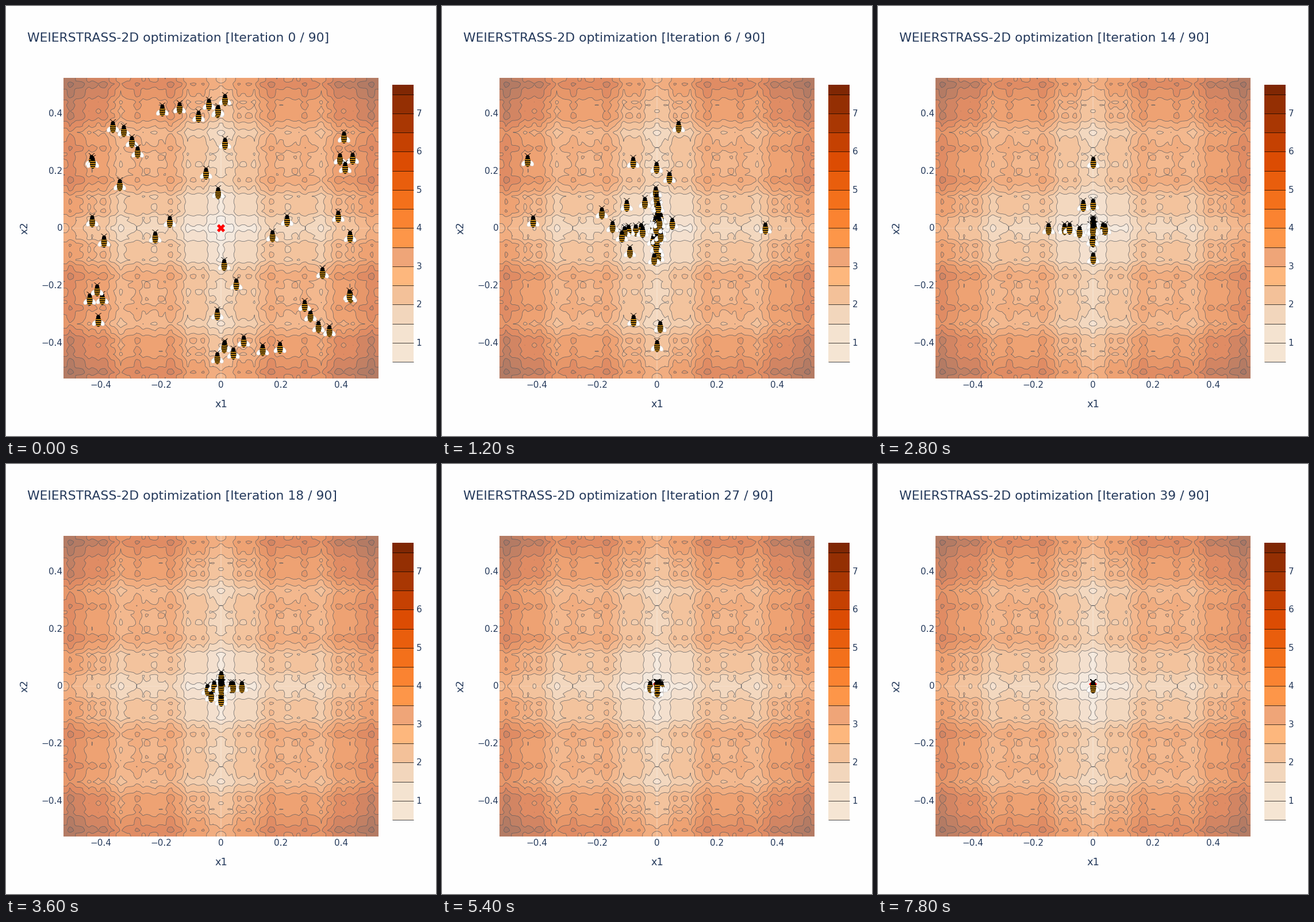
Write a matplotlib script that moves like this. It is 748x748 px and loops after 8000 ms.

```python
import numpy as np
import matplotlib.pyplot as plt
from matplotlib.animation import FuncAnimation
from matplotlib.collections import PathCollection
from matplotlib.patches import PathPatch, Rectangle
from matplotlib.path import Path
from matplotlib.transforms import Affine2D, IdentityTransform

SIZE, DPI = 748, 100
S = SIZE / 600                      # layout is designed on a 600 unit square
PT = 72 / DPI                       # points per pixel
CX, CY = 300 * S, 310 * S           # pixel position of the optimum
KX, KY = 440 * S / 1.05, 420 * S / 1.05
STEPS, SETTLED = 40, 30
INK = "#24395b"
rng = np.random.default_rng(4)

fig = plt.figure(figsize=(SIZE / DPI, SIZE / DPI), dpi=DPI, facecolor="#fefefe")
ax = fig.add_axes([0, 0, 1, 1])
oranges = plt.get_cmap("Oranges")


def text(x, y, s, px, **kw):
    kw = {"ha": "center", "va": "center", **kw}
    return ax.text(x, y, s, fontsize=px * PT, color=INK, family="DejaVu Sans", **kw)


# ---------- contour map ----------
def weierstrass(x):
    k = np.arange(21)[:, None]
    return (0.5 ** k * (1 - np.cos(2 * np.pi * 3.0 ** k * x))).sum(0)


def smooth_loop(p):
    """Closed centripetal Catmull-Rom curve through p, as Bezier segments."""
    back, ahead = np.roll(p, 1, 0) - p, np.roll(p, -1, 0) - p
    a = np.hypot(*back.T)[:, None] ** 0.5
    b = np.hypot(*ahead.T)[:, None] ** 0.5
    num = b * b * back - a * a * ahead
    c_in = p + num / (3 * b * (a + b) + 1e-9)
    c_out = p - num / (3 * a * (a + b) + 1e-9)
    seg = np.stack([c_out, np.roll(c_in, -1, 0), np.roll(p, -1, 0)], 1)
    verts = np.vstack([p[:1], seg.reshape(-1, 2)])
    return Path(verts, [Path.MOVETO] + [Path.CURVE4] * (len(verts) - 1))


def region(xs, ys, z, level):
    cs = ax.contourf(xs, ys, z, levels=[level, 99])
    loops = [smooth_loop(np.asarray(s)[:-1]) for s in cs.allsegs[0] if len(s) > 3]
    cs.remove()
    return Path.make_compound_path(*loops)


def band_color(mid):
    return np.array(oranges((mid - 0.25) / 7.5)[:3])


def map_color(mid):
    return 0.6 * band_color(mid) + 0.4 * np.array([229, 236, 246]) / 255


grid = np.linspace(-0.525, 0.525, 100)
h = grid[1] - grid[0]
f = np.pad(weierstrass(grid), 1, mode="edge")
wide = np.r_[grid[0] - h, grid, grid[-1] + h]
z = f[:, None] + f[None, :]
levels = np.arange(0.5, 7.6, 0.5)
regions = [region(CX + wide * KX, CY - wide * KY, z, v) for v in levels]

box = Rectangle((80 * S, 100 * S), 440 * S, 420 * S, fc=map_color(0.25), ec="none", zorder=1)
ax.add_patch(box)


def on_map(artist):
    ax.add_artist(artist)
    artist.set_clip_path(box)


for v, path in zip(levels, regions):
    on_map(PathPatch(path, fc=map_color(v + 0.25), ec="none", zorder=2))
for xy, w, t in [((80 * S, CY - 0.8), 440 * S, 1.6), ((CX - 0.8, 100 * S), 1.6, 420 * S)]:
    on_map(Rectangle(xy, w, t, fc="white", ec="none", alpha=0.2, zorder=2.5))
for path in regions:
    on_map(PathPatch(path, fc="none", ec=(0.36, 0.37, 0.385), lw=0.66 * PT,
                     joinstyle="round", zorder=3))

# ---------- colour bar ----------
PALE = ["#f5e5d3", "#f4e3d0", "#f2d6bc", "#f3c199", "#fdb77d", "#efa578"]


def bar_y(v):
    return 510 * S - (v - 0.25) * 400 * S / 7.5


for i, v in enumerate(levels):
    top = min(v + 0.5, 7.75)
    fc = PALE[i] if i < len(PALE) else band_color(v + 0.25)
    ax.add_patch(Rectangle((672, bar_y(top)), 37.4, bar_y(v) - bar_y(top), fc=fc, ec="none", zorder=2))
ax.hlines(bar_y(levels), 672, 709.4, color="black", lw=0.7 * PT, zorder=3)
for v in range(1, 8):
    text(713.5, bar_y(v) + 0.3, str(v), 15.2, ha="left")

# ---------- labels ----------
for v in (-0.4, -0.2, 0, 0.2, 0.4):
    label = f"{v:g}".replace("-", "\u2212")
    text(CX + v * KX, 659.3, label, 15.2)
    text(98.6, CY - v * KY + 0.4, label, 15.2, ha="right")
text(CX, 692.5, "x1", 17.8)
text(32, CY, "x2", 17.8, rotation=90)
title = text(37.4, 62.3, "", 21.9, ha="left", va="baseline")

# optimum marker: one arm tip, turned four times
r = 0.4 * 10 * S / np.sqrt(2)
tip = np.array([(0, 1), (1, 2), (2, 1)]) * r
turn = np.array([(0, -1), (1, 0)])
cross = np.vstack([tip @ np.linalg.matrix_power(turn, k) for k in range(4)])
ax.add_patch(plt.Polygon(cross + (CX, CY), fc="red", ec="none", zorder=4))


# ---------- bee shape, in pixels with y upwards ----------
def oval(x, y, w, t, angle=0):
    m = Affine2D().scale(w / 2, t / 2).rotate_deg(angle).translate(x, y)
    return Path.unit_circle().transformed(m)


def stripe(y):
    half = 4.8 * np.sqrt(1 - ((y + 1.8) / 9.6) ** 2)
    return Path([(-half, y + 0.8), (0, y + 0.5), (half, y + 0.8),
                 (half, y - 0.7), (0, y - 1), (-half, y - 0.7)])


def antenna(side):
    return Path([(side, 9), (2 * side, 11.6), (5.2 * side, 12.6)],
                [Path.MOVETO, Path.CURVE3, Path.CURVE3])


parts = [(antenna(s), "none", "black", 0.8) for s in (-1, 1)]
parts += [(oval(6.2 * s, -4.6, 11, 7.4, -48 * s), "white", "#c9c4c0", 0.5) for s in (-1, 1)]
parts += [(oval(0, 6.3, 7, 7), "black", "none", 0), (oval(0, -1.8, 10, 18.6), "black", "none", 0)]
parts += [(stripe(y), "#fbad18", "none", 0) for y in (1.6, -1.9, -5.4, -8.6)]
paths, faces, edges, widths = zip(*parts)

# ---------- swarm ----------
# half of the bees; the other half starts point-mirrored through the optimum
half = np.array([
    (272, 181), (302, 177), (335, 192), (353, 171), (368, 184), (369, 182), (381, 163),
    (186, 210), (205, 217), (219, 236), (229, 254), (149, 269), (151, 272), (198, 311),
    (381, 239), (348, 291), (369, 325), (588, 228), (581, 266), (603, 265), (590, 281),
    (150, 374), (285, 375), (489, 373), (578, 366)])
home = np.array([374.3, 387.5])
pos = np.vstack([half - home, home - half])
eager = rng.uniform(0.25, 0.75, len(pos))
track = [pos]
for step in range(1, STEPS):
    # an eager bee leaps along one axis to somewhere nearer the optimum
    leap = rng.random(len(pos)) < eager
    axis = rng.integers(0, 2, len(pos))
    scale = np.ones_like(pos)
    scale[leap, axis[leap]] = rng.uniform(-0.5, 0.5, leap.sum())
    pos = pos * scale * (step < SETTLED)
    track.append(pos)


def offsets(i):
    return np.repeat(home + track[i], len(parts), axis=0)


swarm = PathCollection(
    paths, facecolors=faces, edgecolors=edges, linewidths=[w * PT for w in widths],
    offsets=offsets(0), offset_transform=ax.transData,
    transform=IdentityTransform(), zorder=5)
ax.add_collection(swarm, autolim=False)

ax.set_xlim(0, SIZE)
ax.set_ylim(SIZE, 0)
ax.set_axis_off()


def update(i):
    title.set_text(f"WEIERSTRASS-2D optimization [Iteration {i} / 90]")
    swarm.set_offsets(offsets(i))
    return title, swarm


anim = FuncAnimation(fig, update, frames=STEPS, interval=200, repeat=True)
plt.show()
```
